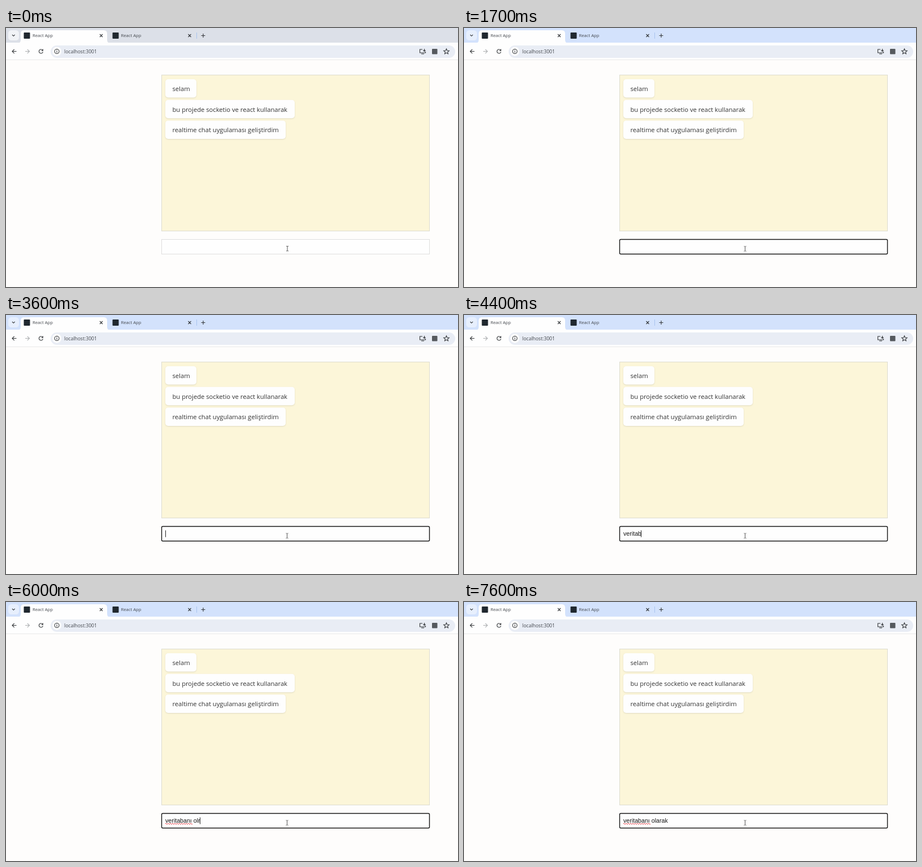
Recreate the animation shown at these times as an HTML page. Size 800 by 460 pixels, loop 8000 ms.

```html
<!DOCTYPE html>
<html lang="tr">
<head>
<meta charset="utf-8">
<title>Chat</title>
<style>
  html, body { margin: 0; width: 800px; height: 460px; overflow: hidden; background: #fefdfc; }
  svg { display: block; }
  text { font-family: "Open Sans", "Noto Sans", sans-serif; white-space: pre; }
  .tab { font-size: 7.7px; fill: #42464c; }
  .url { font-size: 8.6px; fill: #42464c; }
  .message { font-size: 11.2px; fill: #333; }
  .typed { font: 10.67px "Liberation Sans", Arial, sans-serif; fill: #161616; }
  .icon { fill: none; stroke: #333639; stroke-width: 1.1; }
  .bubble { fill: #fefefe; filter: drop-shadow(0 1px 1px #0000001c); }
</style>
</head>
<body>
<svg width="800" height="460" viewBox="0 0 800 460">
  <!-- tab strip -->
  <rect id="strip" width="800" height="27"/>
  <rect id="menu" x="4" y="4" width="19" height="18" rx="5.5"/>
  <path class="icon" d="M11 12l2.3 2.3 2.3-2.3" stroke-width="1.3"/>
  <path fill="#fefefe" d="M20 27q6 0 6-6V10q0-6 6-6H173q6 0 6 6V21q0 6 6 6z"/>
  <g fill="#20282f">
    <rect x="31.500" y="8" width="11" height="11" rx="1"/>
    <rect x="188.500" y="8" width="11" height="11" rx="1"/>
  </g>
  <text class="tab" x="47" y="16.300">React App</text>
  <text class="tab" x="203.500" y="16.300">React App</text>
  <path class="icon" d="M166 11l5 5m0-5l-5 5M322.500 11l5 5m0-5l-5 5"/>
  <path class="icon" d="M345.500 13.500h7m-3.500-3.500v7"/>
  <path d="M337.500 8v11" stroke="#a9c3ee"/>

  <!-- toolbar -->
  <rect y="26" width="800" height="31" fill="#fefefe"/>
  <path d="M0 56.500h800" stroke="#e9e9e9"/>
  <rect x="79" y="31" width="716" height="22" rx="11" fill="#e9edf5"/>
  <path class="icon" d="M18.500 41.500h-7.500m3.700-3.700l-3.700 3.700 3.700 3.700"/>
  <path class="icon" d="M34 41.500h7.500m-3.700-3.700l3.700 3.700-3.700 3.700" style="stroke:#acaeb0"/>
  <path class="icon" d="M64.800 39.500a3.500 3.500 0 1 0 .5 2.800M65.300 37.500v2.700h-2.700"/>
  <circle cx="90" cy="41.500" r="8" fill="#fefefe"/>
  <circle class="icon" cx="90" cy="41.500" r="4"/>
  <path class="icon" d="M90 39v1.200m0 .8v2.700"/>
  <text class="url" x="103" y="44.700">localhost:3001</text>
  <path class="icon" d="M737 38h-4.500v6h10v-2M735 46h5M740.500 37v4.500m-2-2l2 2 2-2"/>
  <rect x="754" y="37" width="9.500" height="9.500" rx="1" fill="#55595e"/>
  <path class="icon" d="M779.500 37l1.350 3.100 3.400.3-2.600 2.200.8 3.300-2.950-1.750-2.950 1.750.8-3.300-2.600-2.200 3.400-.3z"/>

  <!-- chat page -->
  <rect x="275.500" y="83.500" width="474" height="277" fill="#fcf6d9" stroke="#dddccf"/>
  <g id="messages"></g>
  <rect id="field" x="275.500" y="375.500" width="474" height="26" fill="#fefefe"/>
  <text id="typed" class="typed" x="282" y="392"></text>
  <path id="squiggle" fill="none" stroke="#e2343a" stroke-width=".9"/>
  <rect id="caret" y="382.500" width="1" height="12" fill="#222"/>
  <path id="pointer" d="M496 387.500h1.200l.8.600.8-.600h1.200M498 388v7.500M496 396h1.200l.8-.600.8.600h1.200" fill="none" stroke="#444" stroke-width=".9"/>
</svg>
<script>
const LOOP = 8000, FOCUS = 1700, MISSPELLED = 5000, LEFT = 282;
const $ = id => document.getElementById(id);

const messages = [
  ["selam", 55],
  ["bu projede socketio ve react kullanarak", 229],
  ["realtime chat uygulaması geliştirdim", 213],
];
$("messages").innerHTML = messages.map(([text, width], i) => {
  const y = 91 + i * 36.7;
  return `<rect class="bubble" x="282" y="${y}" width="${width}" height="32.500" rx="5"/>
    <text class="message" x="294.500" y="${y + 20.8}">${text}</text>`;
}).join("");

let wave = `M${LEFT} 394`;
for (let x = LEFT; x < 328; x += 4) wave += "q1-2 2 0t2 0";
$("squiggle").setAttribute("d", wave);

// [time, content of the field]
const typing = [
  [0, ""], [4000, "v"], [4100, "ve"], [4200, "veri"], [4300, "verita"],
  [4400, "veritab"], [4500, "veritaba"], [4600, "veritaban"],
  [4800, "veritabanı"], [MISSPELLED, "veritabanı "], [5600, "veritabanı o"],
  [5700, "veritabanı olr"], [6500, "veritabanı ola"],
  [6600, "veritabanı olara"], [6700, "veritabanı olarak "],
];
// [time, caret visible]
const blinks = [[0, false], [2300, true], [2800, false], [3500, true], [7200, false]];

const valueAt = (steps, t) => steps.findLast(([start]) => t >= start)[1];
const show = (id, on) => $(id).setAttribute("visibility", on ? "visible" : "hidden");
const set = (id, attributes) => {
  for (const name in attributes) $(id).setAttribute(name, attributes[name]);
};

function draw() {
  const t = performance.now() % LOOP, focused = t >= FOCUS;
  set("strip", { fill: focused ? "#d3e2fc" : "#dce0e8" });
  set("menu", { fill: focused ? "#e7effd" : "#f1f3f6" });
  set("field", focused
    ? { stroke: "#151515", "stroke-width": 1.4, rx: 2 }
    : { stroke: "#dedede", "stroke-width": 1, rx: 0 });
  set("pointer", { transform: focused ? "translate(-.5 .3)" : "" });

  const text = valueAt(typing, t);
  $("typed").textContent = text;
  show("squiggle", t >= MISSPELLED);
  show("caret", valueAt(blinks, t));
  set("caret", { x: Math.floor(LEFT + (text && $("typed").getComputedTextLength())) });
  requestAnimationFrame(draw);
}
draw();
</script>
</body>
</html>
```
